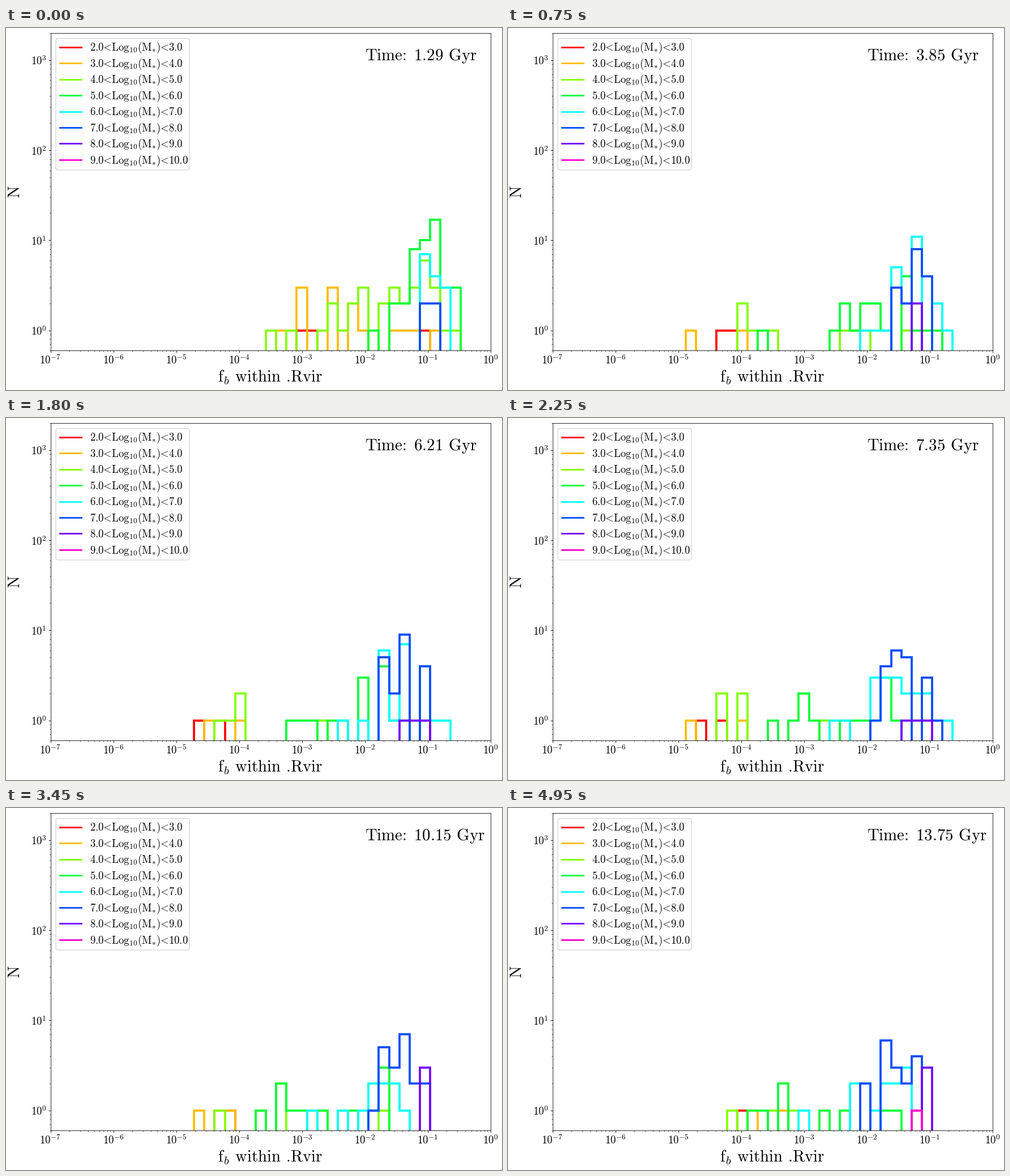
These frames come from a looping animation (876x640 px, 5100 ms). A matplotlib script:

```python
import numpy as np
import matplotlib.pyplot as plt
from matplotlib.animation import FuncAnimation
from matplotlib.patches import FancyBboxPatch
from matplotlib.ticker import FuncFormatter, LogLocator, NullFormatter

plt.rcParams["mathtext.fontset"] = "cm"

W, H, DPI = 876, 640, 64
PX = 72 / DPI                       # points per pixel
SMALL, LARGE = 18.75 * PX, 28.9 * PX
FRAMES, INTERVAL = 34, 150
EDGES = np.logspace(-7, 1, 50)
FLOOR = 1e-3                        # stands for an empty bin on the log axis
NAMES = ["red", "orange", "lime", "green", "cyan", "blue", "violet", "magenta"]
COLORS = [plt.cm.hsv(i / 8) for i in range(8)]

snaps = []


def snap(frame, gyr, **runs):
    """Store a snapshot; each run maps a first bin to consecutive counts."""
    bins = []
    for name in NAMES:
        row = []
        for first, counts in runs.get(name, {}).items():
            for i, n in enumerate(counts):
                row += [first + i] * n
        bins.append(row)
    snaps.append((frame, gyr, bins))


snap(0, 1.29,
     red={24: [1, 1], 36: [1]},
     orange={22: [1, 1, 3], 27: [3], 29: [2, 1], 33: [1, 1, 1], 37: [1]},
     lime={21: [1], 23: [1], 26: [1, 2, 1, 2, 3], 32: [2, 3, 2, 3, 6, 3, 1, 1]},
     green={31: [1], 33: [2, 2, 8, 10, 17, 3, 3]},
     cyan={36: [7, 4, 3]},
     blue={36: [2, 2]})
snap(5, 3.85,
     red={16: [1, 1]},
     orange={13: [1], 18: [1]},
     lime={18: [2, 1, 1, 1], 28: [1, 1, 1], 34: [1]},
     green={20: [1], 27: [1, 2, 1, 2, 2, 1], 34: [4, 1, 1, 1]},
     cyan={30: [1, 1, 1, 5, 2, 11], 37: [2, 1]},
     blue={33: [3, 2, 8, 4]},
     violet={35: [2]})
snap(9, 5.08,
     red={14: [1], 16: [1]},
     orange={17: [2]},
     lime={17: [1, 2, 1], 26: [1]},
     green={25: [2, 1], 28: [1], 30: [2, 2, 1, 5, 1, 1]},
     cyan={30: [1, 1, 4, 3, 8], 36: [3, 3], 39: [1]},
     blue={32: [3, 4, 8, 1, 3]},
     violet={35: [2, 1]})
snap(15, 7.35,
     red={14: [1], 16: [1]},
     orange={13: [1], 18: [1]},
     lime={16: [2], 18: [2], 26: [1]},
     green={21: [1], 23: [1, 2, 1], 28: [1, 1, 1, 1, 3, 1]},
     cyan={27: [1, 1], 31: [3, 3, 3, 2, 2, 2, 1, 1]},
     blue={31: [1, 4, 6, 5], 36: [3, 1]},
     violet={34: [1, 1, 1]})
snap(19, 8.75,
     red={14: [1], 16: [1]},
     orange={11: [1], 13: [1], 20: [1, 1]},
     lime={16: [1, 2], 19: [1], 27: [1], 32: [1]},
     green={21: [1, 1], 24: [1, 2, 1], 28: [2, 1, 1], 32: [3]},
     cyan={26: [1], 28: [1], 31: [3, 3, 2, 1]},
     blue={31: [1, 5, 3, 9], 36: [2]},
     violet={35: [2, 1]})
snap(27, 11.55,
     red={18: [1]},
     orange={16: [1], 21: [1], 29: [1]},
     lime={17: [1], 26: [2], 31: [1]},
     green={19: [1], 21: [2, 1], 25: [1], 29: [2], 32: [2, 1]},
     cyan={24: [1], 29: [1, 1, 3], 33: [3, 1]},
     blue={31: [3, 3, 3, 4, 4, 3, 1]},
     violet={36: [3]},
     magenta={35: [1]})
snap(33, 13.75,
     red={18: [1]},
     orange={19: [1], 22: [1]},
     lime={17: [1], 21: [1], 23: [1]},
     green={19: [1, 1], 22: [2], 26: [1], 28: [1], 32: [1, 1]},
     cyan={24: [1], 29: [2, 2, 1, 2, 2, 3]},
     blue={30: [2], 32: [6, 3, 2, 4]},
     violet={36: [3]},
     magenta={35: [1]})

STOPS = [s[0] for s in snaps]


def drift(a, b, u):
    """Histogram part-way between two samples, matched by rank."""
    n = int(round(len(a) + (len(b) - len(a)) * u))
    a, b = np.array(a or b), np.array(b or a)
    if n == 0:
        return np.zeros(len(EDGES) - 1)
    q = (np.arange(n) + 0.5) / n
    pa = a[(q * len(a)).astype(int)]
    pb = b[(q * len(b)).astype(int)]
    pos = np.rint(pa + (pb - pa) * u).astype(int)
    return np.bincount(pos, minlength=len(EDGES) - 1)


def roman(s):
    return r"$\mathrm{%s}$" % s


def clock(gyr):
    return roman(r"Time\hspace{-0.2}:\hspace{0.3}%.2f\hspace{0.38}Gyr" % gyr)


fig = plt.figure(figsize=(W / DPI, H / DPI), dpi=DPI, facecolor="white")

# Histogram axes
ax = fig.add_axes([78.5 / W, 70 / H, 777 / W, 561 / H])
ax.set(xscale="log", yscale="log", xlim=(1e-7, 1), ylim=(0.6, 2000))
power = FuncFormatter(lambda v, _: "$10^{%d}$" % round(np.log10(v)))
for axis in (ax.xaxis, ax.yaxis):
    axis.set_major_locator(LogLocator(numticks=20))
    axis.set_minor_locator(LogLocator(subs=range(2, 10), numticks=99))
    axis.set_major_formatter(power)
    axis.set_minor_formatter(NullFormatter())
ax.tick_params(which="major", length=3.65 * PX * 1.6, width=0.83 * PX,
               pad=3.65 * PX, labelsize=SMALL)
ax.tick_params(which="minor", length=2.1 * PX * 1.6, width=0.63 * PX)
ax.tick_params(which="both", length=3.65 * PX)
ax.tick_params(which="minor", length=2.1 * PX)
for spine in ax.spines.values():
    spine.set_linewidth(0.83 * PX)

steps = [ax.stairs(np.full(len(EDGES) - 1, FLOOR), EDGES, baseline=FLOOR,
                   color=c, lw=3.75 * PX, zorder=1.5) for c in COLORS]
ax.set(xlim=(1e-7, 1), ylim=(0.6, 2000))
time_text = ax.text(1e-2, 1e3, clock(0), fontsize=LARGE, va="baseline")

# Pixel-space overlay for legend and axis titles
hud = fig.add_axes([0, 0, 1, 1])
hud.set(xlim=(0, W), ylim=(H, 0))
hud.axis("off")
hud.add_patch(FancyBboxPatch(
    (88, 18.5), 236, 232.5, boxstyle="round,pad=0,rounding_size=3.75",
    fc="white", ec="0.8", lw=1.04 * PX))
LT = r"\hspace{-0.2}<\hspace{-0.2}"
for i, c in enumerate(COLORS):
    y = 33.7 + 28.45 * i
    hud.plot([95.4, 132.8], [y, y], color=c, lw=2.8 * PX)
    label = f"{i + 2}.0{LT}Log_{{10}}(M_{{*}}){LT}{i + 3}.0"
    hud.text(147.8, y + 6.6, roman(label), fontsize=SMALL, va="baseline")
hud.text(466.5, 626, roman(r"f_{\mathit{b}}\hspace{0.38}within"
                           r"\hspace{0.38}.\hspace{-0.2}Rvir"),
         fontsize=LARGE, ha="center", va="baseline")
hud.text(30.5, 290, roman("N"), fontsize=LARGE, rotation=90,
         ha="right", va="center")
hud.set(xlim=(0, W), ylim=(H, 0))


def update(f):
    j = min(np.searchsorted(STOPS, f, side="right") - 1, len(snaps) - 2)
    (fa, ta, a), (fb, tb, b) = snaps[j], snaps[j + 1]
    u = (f - fa) / (fb - fa)
    for step, ra, rb in zip(steps, a, b):
        step.set_data(values=np.maximum(drift(ra, rb, u), FLOOR))
    time_text.set_text(clock(ta + (tb - ta) * u))
    return steps + [time_text]


anim = FuncAnimation(fig, update, frames=FRAMES, interval=INTERVAL,
                     init_func=lambda: update(0), repeat=True,
                     repeat_delay=0, blit=False)
plt.show()
```
